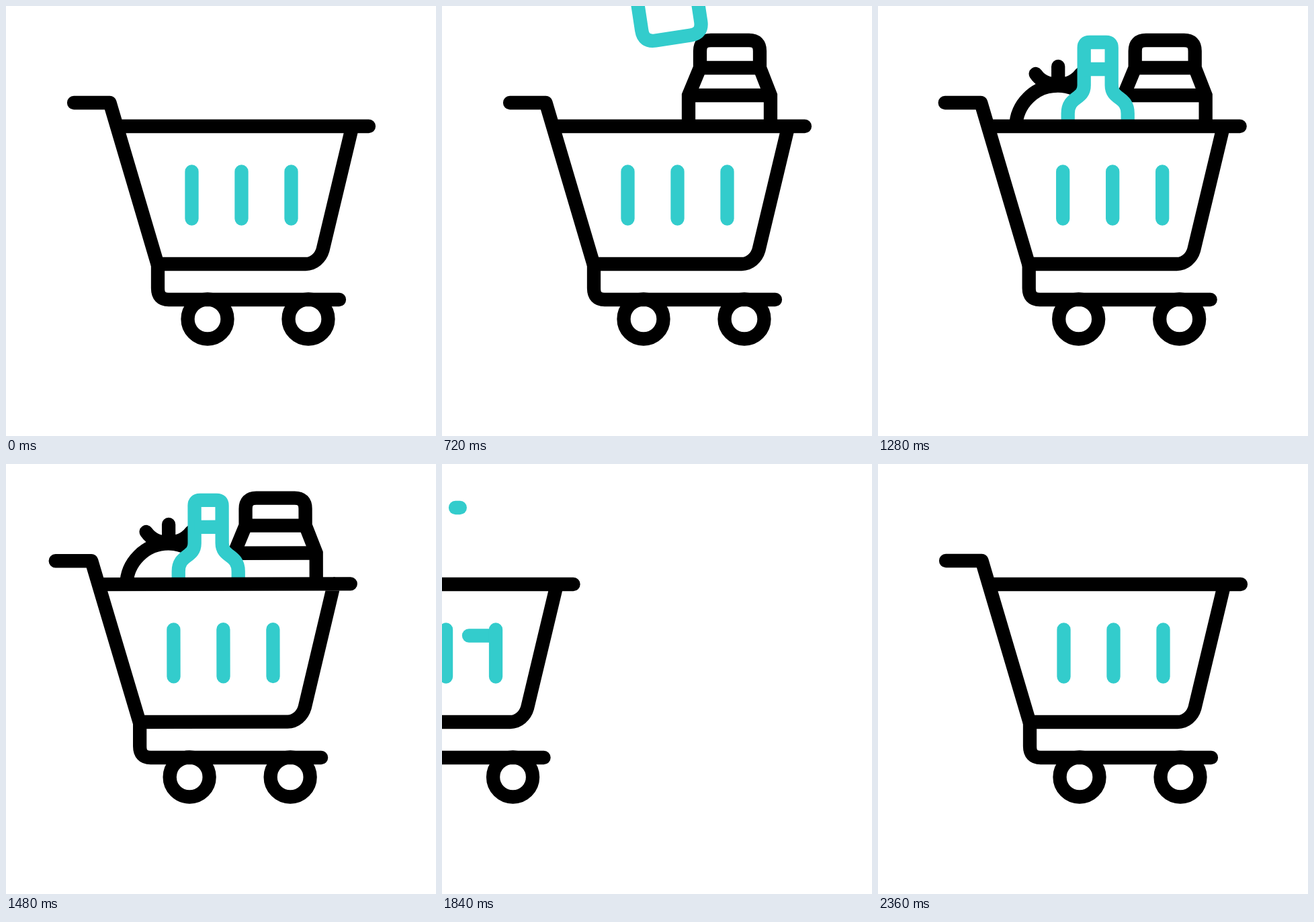
Recreate the animation shown at these times as an HTML page. Size 640 by 640 pixels, loop 2600 ms.

```html
<!DOCTYPE html>
<html lang="en">
<head>
<meta charset="utf-8">
<title>Shopping cart</title>
<style>
  html, body { margin: 0; width: 100%; height: 100%; overflow: hidden; background: #fff; }
  svg { display: block; width: 100vw; height: 100vh; }
  .line { fill: none; stroke: #000; stroke-width: 20.3; }
  .round { stroke-linecap: round; stroke-linejoin: round; }
  .teal { stroke: #3cc; }
  .solid { fill: #fff; }
</style>
</head>
<body>
<svg viewBox="0 0 640 640">
  <clipPath id="above"><rect x="-400" y="-600" width="1500" height="779"/></clipPath>
  <g id="dashes" class="line round teal"><path/><path/><path/></g>
  <g id="cart" class="line">
    <g id="body">
      <g id="items" clip-path="url(#above)">
        <g id="carton">
          <path class="solid" d="M367 133L384 92V67Q384 51 400 51H457Q473 51 473 67V92L489 133V261Q489 279 471 279H385Q367 279 367 261Z"/>
          <path d="M384 92H473M367 133H489"/>
        </g>
        <g id="tomato" class="round">
          <circle class="solid" cx="269" cy="181" r="62.5"/>
          <path d="M269.5 90V112M236 101Q247 117 269 117Q291 117 303 101"/>
        </g>
        <g id="bottle" class="teal">
          <path class="solid" d="M284 242V160C284 134 308 140 308 118V62Q308 54 316 54H341Q349 54 349 62V118C349 140 373 134 373 160V242Q373 260 355 260H302Q284 260 284 242Z"/>
          <path d="M308 94H349"/>
        </g>
      </g>
      <g class="round">
        <path d="M101 144H154.5L225.5 384H446C458 384 468 375 471.5 363L515.5 179M165 179H540"/>
        <path class="teal" d="M276.5 246.5V316.5M350.5 246.5V316.5M424.5 246.5V316.5"/>
      </g>
    </g>
    <path class="round" d="M226 384V420Q226 437 242 437H496"/>
    <circle cx="300" cy="466" r="29.5"/>
    <circle cx="450" cy="466" r="29.5"/>
  </g>
</svg>
<script>
const LOOP = 2600;
const el = id => document.getElementById(id);
const ramp = (t, a, b) => Math.min(1, Math.max(0, (t - a) / (b - a)));
const smooth = (t, a, b) => { const p = ramp(t, a, b); return p * p * (3 - 2 * p); };

// start time, lean in degrees, centre of rotation
const items = [
  { id: 'carton', start: 219, lean: 8.6, x: 428, y: 165 },
  { id: 'bottle', start: 611, lean: -8.6, x: 328.5, y: 157 },
  { id: 'tomato', start: 825, lean: -8.6, x: 269, y: 181 }
];

// right end, height, left end, start time
const dashes = [
  [199, 65, 20, 1550],
  [169, 255.5, 40, 1590],
  [57, 347, -40, 1560]
];

function drop({ id, start, lean, x, y }, t) {
  const land = start + 195, rest = land + 195;
  const dy = -310 * (1 - ramp(t, start, land) ** 2) + 12 * Math.sin(Math.PI * ramp(t, land, rest));
  const turn = lean * (1 - smooth(t, land, rest));
  el(id).setAttribute('transform', `translate(0 ${dy}) rotate(${turn} ${x} ${y})`);
}

function cartX(t) {
  if (t < 1440) return -30 * smooth(t, 1258, 1440);
  if (t < 1780) return -30 + 127 * ((t - 1440) / 180) ** 2.5;
  if (t < 2080) return 30 - 590 * (1 - ramp(t, 1780, 2080)) ** 2;
  return 30 * (1 - smooth(t, 2080, 2360));
}

function drawDash(path, [right, y, left, start], t) {
  const at = p => right + (left - right) * p;
  const head = at(smooth(t, start, start + 200));
  const tail = at(smooth(t, start + 110, start + 315));
  path.setAttribute('d', tail - head > 0.1 ? `M${head} ${y}H${tail}` : '');
}

function frame(now) {
  const t = now % LOOP;
  const leaving = t < 1780;
  items.forEach(item => drop(item, t));
  el('items').style.display = leaving ? '' : 'none';
  el('cart').setAttribute('transform', `translate(${cartX(t)} 0)`);
  const tilt = leaving ? -2 * smooth(t, 1440, 1735) : 0;
  el('body').setAttribute('transform', `rotate(${tilt} 226 384)`);
  dashes.forEach((dash, i) => drawDash(el('dashes').children[i], dash, t));
  requestAnimationFrame(frame);
}
requestAnimationFrame(frame);
</script>
</body>
</html>
```
